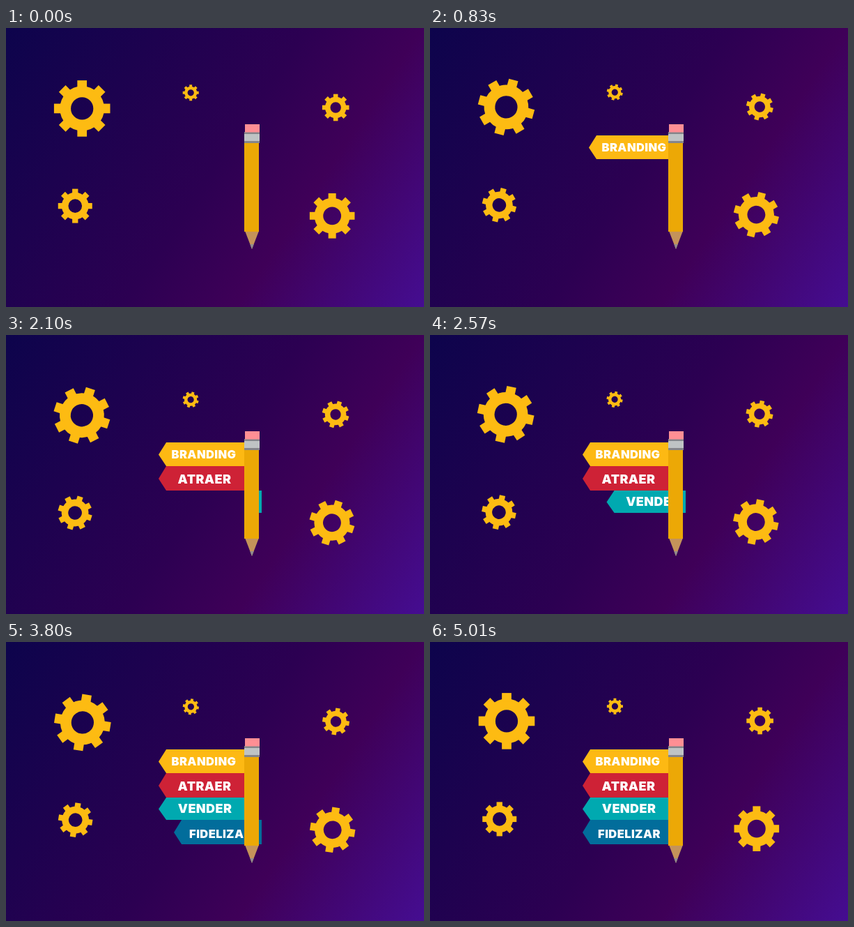
These frames come from a looping animation (600 px wide and 400 px high, 5050 ms). An HTML page:

```html
<!DOCTYPE html>
<html lang="es">
<head>
<meta charset="utf-8">
<style>
html, body { margin: 0; width: 100%; height: 100%; overflow: hidden; }
body { background: linear-gradient(123.7deg, #0d044c, #2c0052 50%, #3f0058 69%, #450d91); }
svg { display: block; width: 600px; height: 400px; }
text { font-family: Inter, "Open Sans", sans-serif; font-weight: 900; letter-spacing: .4px; fill: #fff; text-anchor: middle; }
</style>
</head>
<body>
<svg viewBox="0 0 600 400">
  <defs>
    <clipPath id="window"><rect x="200" y="140" width="167" height="170"/></clipPath>
    <g id="gear">
      <circle r=".595" fill="none" stroke="#fdbb12" stroke-width=".39"/>
    </g>
  </defs>
  <g id="gears"></g>
  <g id="signs" clip-path="url(#window)"></g>
  <g id="pencil">
    <path d="M343 291h20l-10 26z" fill="#c4935a"/>
    <path d="M350.3 310h5.4l-2.7 7z" fill="#8f8c90"/>
    <path d="M342 164h21v128h-21z" fill="#eca806"/>
    <path d="M342 149h22v16h-22z" fill="#85858a"/>
    <path d="M342 152h22v10h-22z" fill="#bfc3c4"/>
    <path d="M343 138h21v11.5h-21z" fill="#ff8f94"/>
  </g>
</svg>
<script>
const LOOP = 5050, FRAME = 33.34, LAST = 150;
const SLIDE = 30, TRAVEL = 148;   // frames, pixels

function add(parent, tag, attrs, text = '') {
  const el = document.createElementNS('http://www.w3.org/2000/svg', tag);
  for (const k in attrs) el.setAttribute(k, attrs[k]);
  el.textContent = text;
  return parent.appendChild(el);
}

const byId = id => document.getElementById(id);

for (let a = 0; a < 360; a += 45)
  add(byId('gear'), 'rect', { x: -.17, y: -1, width: .34, height: .32, fill: '#fdbb12', transform: `rotate(${a})` });

// x, y, radius
const gears = [
  [109.6, 114.4, 40.3], [99.5, 254.5, 24.5], [265.3, 92.5, 11.5],
  [473.4, 113.5, 19.3], [468.5, 268.5, 32.3]
].map(([x, y, r]) => ({ x, y, r, el: add(byId('gears'), 'use', { href: '#gear' }) }));

// label, colour, top, bottom, text centre, baseline, font size, start frame
const signs = [
  ['BRANDING', '#fdb913', 154, 188, 284, 177, 16.5, -.5],
  ['ATRAER', '#ce2236', 188, 223, 285, 212.5, 18, 32.2],
  ['VENDER', '#00a9b0', 223, 255, 285.5, 245, 18, 56.4],
  ['FIDELIZAR', '#026d9b', 255, 290, 286, 281, 16.5, 91.3]
].map(([label, fill, top, bottom, x, y, size, start]) => {
  const el = add(byId('signs'), 'g', {});
  add(el, 'path', { d: `M219 ${(top + bottom) / 2 + .5}L230 ${top}H350V${bottom}H230z`, fill });
  add(el, 'text', { x, y, 'font-size': size }, label);
  return { el, start };
});

function draw(time) {
  const n = Math.min(LAST, Math.floor((time % LOOP + 4) / FRAME));
  // the gears' pivots sit slightly off centre
  for (const { x, y, r, el } of gears)
    el.setAttribute('transform', `translate(${x} ${y}) rotate(${n * 6}) scale(${r}) translate(-.01 .025)`);
  for (const { el, start } of signs) {
    const p = Math.max(0, Math.min(1, (n - start) / SLIDE));
    const eased = p * p * (3 - 2 * p);
    el.setAttribute('transform', `translate(${TRAVEL * (1 - eased)} 0)`);
  }
}

const begin = performance.now();
function tick() {
  draw(performance.now() - begin);
  requestAnimationFrame(tick);
}
tick();
</script>
</body>
</html>
```
